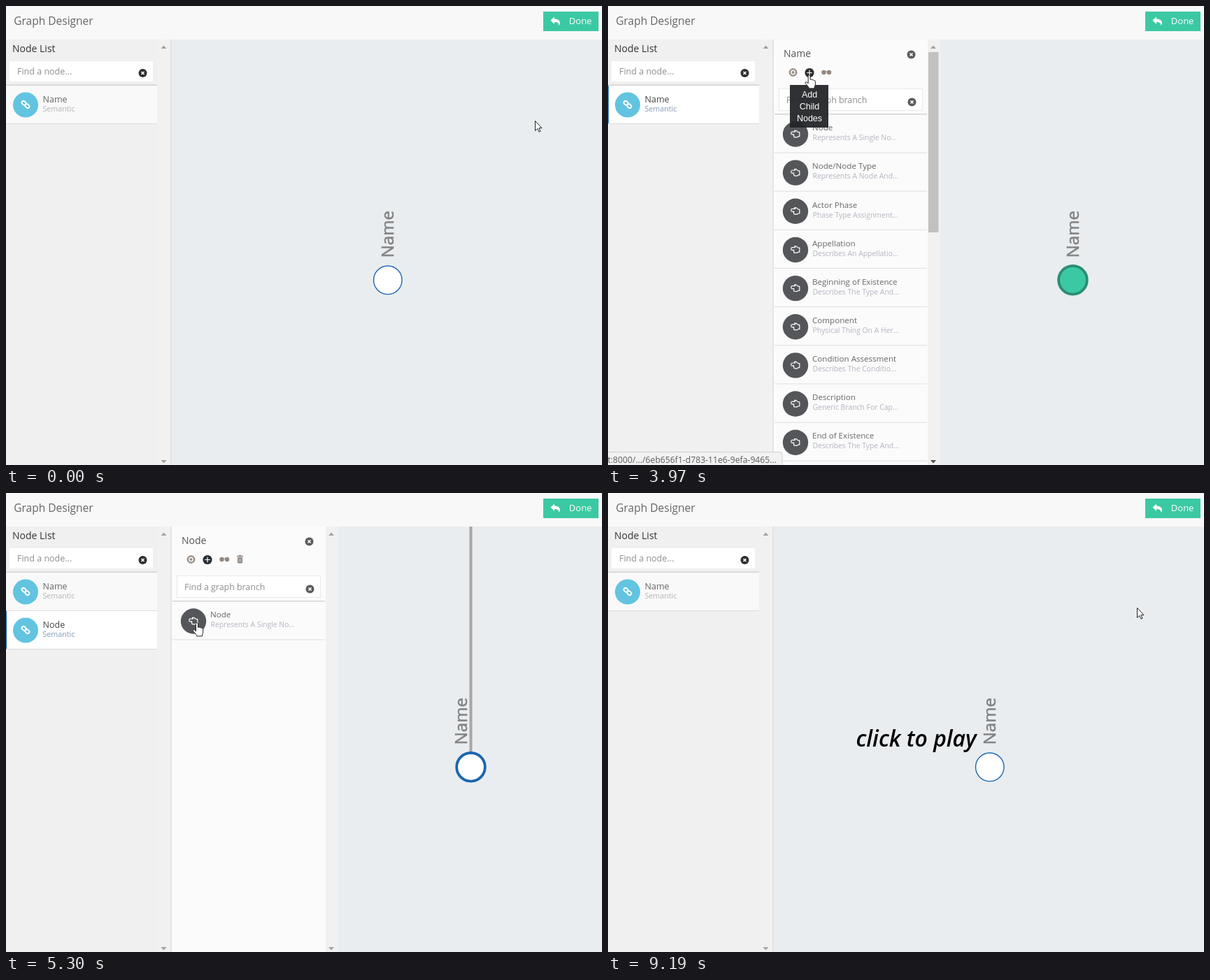
These frames come from a looping animation (852x657 px, 9250 ms). An HTML page:

```html
<!DOCTYPE html>
<html lang="en">
<head>
<meta charset="utf-8">
<title>Graph Designer</title>
<style>
  html, body { margin: 0; width: 100%; height: 100%; overflow: hidden; background: #e9edf0; }
  svg { display: block; font-family: "Open Sans", sans-serif; }
  .tip { font-family: "Liberation Sans", Arial, sans-serif; }
</style>
</head>
<body>
<svg id="stage" width="852" height="657" viewBox="0 0 852 657"></svg>
<script>
const stage = document.getElementById('stage');
const $ = id => document.getElementById(id);
const show = (id, on) => $(id).setAttribute('display', on ? 'inline' : 'none');
const move = (id, x, y, k = 1) => $(id).setAttribute('transform', `translate(${x} ${y}) scale(${k})`);

// Markup helpers
const text = (x, y, size, str, fill, extra = '') =>
  `<text x="${x}" y="${y}" font-size="${size}" fill="${fill}" ${extra}>${str}</text>`;
const rect = (x, y, w, h, fill, extra = '') =>
  `<rect x="${x}" y="${y}" width="${w}" height="${h}" fill="${fill}" ${extra}/>`;
const circle = (x, y, r, fill, extra = '') =>
  `<circle cx="${x}" cy="${y}" r="${r}" fill="${fill}" ${extra}/>`;
const path = (d, extra) => `<path d="${d}" ${extra}/>`;
const group = (id, body, extra = '') => `<g id="${id}" ${extra}>${body}</g>`;
const field = (x, y, w, h) => rect(x + .5, y + .5, w - 1, h - 1, '#fff', 'stroke="#e9e9e9"');
const range = (n, fn) => Array.from({ length: n }, (_, i) => fn(i)).join('');

const closeIcon = (x, y, fill) => circle(x, y, 6, fill) +
  path(`M${x - 2} ${y - 2}l4 4m0-4l-4 4`, 'stroke="#fff" stroke-width="1.6"');
const scrollArrows = (x, y2 = 650) =>
  path(`M${x - 4} 61h8l-4-4.5zM${x - 4} ${y2}h8l-4 4.5z`, 'fill="#a3a3a3"');

function listItem(y, name, active) {
  const link = x => `<rect x="${x}" y="-2.4" width="6.6" height="4.8" rx="2.4"/>`;
  return rect(0, y, 216, 54, active ? '#fff' : '#f9f9f9') +
    rect(0, y + 54, 216, 1, '#dcdcdc') +
    (active ? rect(0, y, 1.2, 54, '#2c78b5') : '') +
    circle(28, y + 27.5, 18, '#62c4e0') +
    `<g transform="translate(28 ${y + 27}) rotate(42)" fill="none" stroke="#fff" stroke-width="1.9">${link(-6.4)}${link(-.2)}</g>` +
    text(52.5, y + 24, 12.5, name, active ? '#444' : '#666') +
    text(52.5, y + 37, 10.7, 'Semantic', active ? '#839ab5' : '#b4b4ba');
}

function branchRow(i, title, detail) {
  const y = 183.5 + 55.15 * i;
  return rect(238, y + 26, 218, 1, '#dfdfdf') + circle(268, y, 18.2, '#545659') +
    path(`M263 ${y - 3.4}h4.6l-1-1.8h2.2l3 2.4h2v6h-2l-1.2 1.2h-3.6c-1.4 0-1.6-1.2-1-1.8-1-.4-1-1.6-.2-2.2h-2.8c-1.7 0-1.7-3.8 0-3.8z`,
      'fill="none" stroke="#fff" stroke-width="1.2" stroke-linejoin="round"') +
    text(292, y - 5.3, 11.6, title, '#666') + text(292.5, y + 8.7, 10.4, detail, '#b3b5c1');
}

const branches = [
  ['Node', 'Represents A Single No...'], ['Node/Node Type', 'Represents A Node And...'],
  ['Actor Phase', 'Phase Type Assignment...'], ['Appellation', 'Describes An Appellatio...'],
  ['Beginning of Existence', 'Describes The Type And...'], ['Component', 'Physical Thing On A Her...'],
  ['Condition Assessment', 'Describes The Conditio...'], ['Description', 'Generic Branch For Cap...'],
  ['End of Existence', 'Describes The Type And...']];

const gear = fill => circle(264.5, 95, 4.6, 'none', `stroke="${fill}" stroke-width="2.4"`) +
  circle(264.5, 95, 5.5, 'none', `stroke="${fill}" stroke-dasharray="2 1.4"`) + circle(264.5, 95, 2, fill);
const plus = fill => circle(288, 95.5, 6.6, fill) +
  path('M284.2 95.5h7.6M288 91.7v7.6', 'stroke="#fff" stroke-width="1.2"');

const form = (id, name, label, lines, on) => group(id,
  text(247, 151, 12.5, 'Node Name', '#666') + field(247, 157, 197, 31) + text(259, 177, 10.9, name, '#666') +
  text(247, 235, 12.5, 'Data type', '#666') + field(247, 241, 197, 35) + text(259.5, 262, 12.5, 'semantic', '#555') +
  path('M425.5 255.5h9l-4.5 5z', 'fill="#5c5048"') + rect(242, 303, 207, 1, '#d9d9d9') +
  rect(247.5, 319.5, 25.5, 13.5, on ? '#68bb6c' : '#fff', `rx="6.7" stroke="${on ? '#68bb6c' : '#ddd'}"`) +
  circle(on ? 266.5 : 254.5, 326.5, 6.2, '#fff', `stroke="${on ? '#a9d7ab' : '#bbb'}"`) +
  text(285, 331, 12.6, label, '#555') +
  lines.map((s, i) => text(285, 345 + 13.5 * i, 9.6, s, '#8a9bb2')).join(''));

const label = (id, body, x, y) => text(0, 0, 24, body, '#858585',
  `id="${id}" stroke="#777" stroke-width=".5" transform="translate(${x} ${y}) rotate(-90)"`);

const spinner = range(8, i => {
  const a = (-42 - 45 * i) * Math.PI / 180;
  return circle(57 * Math.cos(a), 57 * Math.sin(a), Math.max(10.5, 18 - 2.5 * i), '#8c8c8c', 'opacity=".38"');
});

stage.innerHTML =
  rect(0, 0, 852, 657, '#e9edf0') +
  group('graph',
    path('M0 0V-952', 'id="edge" stroke="#a6a6a6" stroke-width="4"') +
    group('child', circle(0, -952, 20.3, '#3bc9a3', 'stroke="#2a8f74" stroke-width="3.6"') + label('childName', 'Node', 9, -984)) +
    circle(0, 0, 20, '#fff', 'id="root"') + label('rootName', 'Name', 9, -32)) +

  rect(0, 0, 852, 48, '#f8f8f8') + text(11.3, 27, 15.5, 'Graph Designer', '#666') +
  rect(768, 8, 79, 28, '#3bc9a3') +
  group('done', path('M778.5 20.5l5.5-5v3c5.5 0 8 2.5 8 5.5 0 2-1 3-1.8 4 .6-3.5-1.7-5-6.2-5v3z', 'fill="#fff"') +
    text(804.8, 26, 13, 'Done', '#fff')) +

  rect(0, 48, 216, 609, '#f0f0f0') + rect(216, 48, 20, 609, '#f1f1f1') + rect(235.5, 48, 1, 609, '#d9d9d9') +
  scrollArrows(225.5) + text(9, 66, 14, 'Node List', '#333') +
  rect(5, 79, 205, 29, '#fff') + text(16, 98, 12.5, 'Find a node...', '#8d8d8d') + closeIcon(195.5, 96, '#2b2e31') +
  rect(0, 112.5, 216, 1.5, '#d4d4d4') +
  group('idleName', listItem(114, 'Name', false)) +
  group('activeName', listItem(114, 'Name', true)) +
  group('activeNode', listItem(169, 'Node', true)) +

  group('panel',
    rect(237, 48, 220, 609, '#fbfbfb') + rect(457, 48, 18, 609, '#f1f1f1') + scrollArrows(465) +
    text(251, 73, 14, 'Name', '#555', 'id="title"') + closeIcon(433.5, 69.5, '#5b5b5b') +
    group('gearOn', gear('#2b2e31')) + group('gearOff', gear('#9c9189')) +
    group('plusOn', plus('#2b2e31')) + group('plusOff', plus('#94877f')) +
    circle(308.5, 95, 3.2, '#94877f') + circle(316, 95, 3.2, '#94877f') + rect(306, 93.5, 12, 1, '#94877f') +
    group('trash', path('M330 90.5h9M333 89.5h3', 'stroke="#8f8681" stroke-width="1.6"') +
      rect(331, 92, 7, 8.5, '#8f8681', 'rx="1"') + path('M333.3 93.5v5.5m2.4-5.5v5.5', 'stroke="#ddd" stroke-width=".8"')) +
    form('nameForm', 'Name', 'Make card', ['Data from nodes not collected in', 'other cards will be collected in the', "root card's form section"], true) +
    form('nodeForm', 'Node', 'Make sub-card', ['Data from this node and', 'downstream nodes will be', 'collected in a single form section'], false) +
    group('branches',
      field(244, 118, 206, 32) + text(255, 139, 12.4, 'Find a graph branch', '#8d8d8d') + closeIcon(434.5, 137.5, '#5b5b5b') +
      rect(238, 154, 218, 1.5, '#d4d4d4') + branchRow(0, ...branches[0]) + rect(236.5, 156, 1.2, 53, '#2c78b5', 'id="rowMark"') +
      group('moreRows', branches.slice(1).map((b, i) => branchRow(i + 1, ...b)).join('') +
        rect(458, 66, 14.5, 258, '#c1c1c1') + path('M461 650h8l-4 4.5z', 'fill="#555"')))) +

  group('dim', rect(0, 0, 852, 657, '#8a8a8a', 'opacity=".51"') + rect(769, 9, 77, 26, '#3aa890') +
    '<use href="#done" opacity=".8"/>' + circle(664.5, 392.5, 22.3, '#2b9680') + group('spinner', spinner)) +

  group('status', path('M-1 638.5H246q3 0 3 3V658H-1z', 'fill="#f2f2f2" stroke="#cfcfcf"') +
    text(241, 654, 12.2, 't:8000/.../6eb656f1-d783-11e6-9efa-9465...', '#5c5c5c', 'text-anchor="end"')) +
  group('tooltip', rect(260, 113, 55, 61, '#242528', 'opacity=".94"') +
    ['Add', 'Child', 'Nodes'].map((s, i) => text(288, 131 + 17 * i, 12.5, s, '#fff', 'class="tip" text-anchor="middle"')).join('')) +
  text(354.5, 363, 31.9, 'click to play', '#000', 'id="play" font-weight="600" font-style="italic"') +
  group('cursor',
    path('M.5.5V14.5L3.8 11.5L6 16.2L8 15.3L5.9 10.7H10z', 'id="arrow" fill="#fff" stroke="#222"') +
    path('M-1.5 1.5c0-2 3-2 3 0v5c.5-1 2.5-.8 2.6.4.8-.8 2.4-.4 2.5.7.9-.5 2.1 0 2.1 1.3v4c0 2.2-1.4 3-1.4 6H-.2c-.4-2.5-3.3-4.5-5.2-7.3-1-1.6.9-2.7 2.1-1.5l1.8 1.7z',
      'id="hand" fill="#fff" stroke="#222"'));

// Pointer moves: start, end, number of jumps, destination
const moves = [
  [310, 1190, 13, 557, 401], [1790, 2700, 13, 288, 97], [3970, 4690, 11, 273, 186],
  [5440, 6180, 11, 642, 392], [6400, 6480, 2, 644, 379], [7000, 7210, 4, 692, 337], [7280, 7790, 8, 618, 424]];

function pointer(t) {
  let x = 756, y = 164;
  for (const [from, to, jumps, nx, ny] of moves) {
    if (t < from) break;
    const p = Math.min(1, (Math.floor((t - from) * (jumps - 1) / (to - from)) + 1) / jumps);
    const e = p * p * (3 - 2 * p);
    x += (nx - x) * e;
    y += (ny - y) * e;
  }
  return [x, y];
}

function draw(t) {
  if (t >= 9190) { draw(0); show('play', true); return; }
  const within = (a, b) => t >= a && t < b;
  const [x, y] = pointer(t);
  const open = t >= 1270, added = t >= 5150;
  const listing = within(3280, 5440);

  show('play', false);
  show('panel', open);
  show('idleName', !open || added);
  show('activeName', open && !added);
  show('activeNode', added);
  $('title').textContent = added ? 'Node' : 'Name';
  show('gearOn', !listing);
  show('gearOff', listing);
  const plusHot = within(2640, 5440);
  show('plusOn', plusHot);
  show('plusOff', !plusHot);
  show('trash', added);
  show('nameForm', t < 3280);
  show('nodeForm', t >= 5440);
  show('branches', listing);
  show('moreRows', !added);
  show('rowMark', within(5150, 5300));
  show('tooltip', within(2640, 4110));
  show('status', within(2700, 4110));
  show('dim', within(5000, 5150));
  $('spinner').setAttribute('transform', `translate(403 321) rotate(${t < 5075 ? 0 : 45})`);

  // Graph: each wheel notch shrinks it by the fourth root of two, then it is dragged
  const hover = !open && Math.hypot(x - 545.5, y - 392) < 21;
  const notches = [6400, 6480, 6620, 6840].filter(s => t >= s).length;
  const k = 2 ** (-notches / 4);
  const [px, py] = t >= 7280 ? [x - 692, y - 337] : [0, 0];
  move('graph', (open ? 664.5 : 545.8) + 170 * (1 - k) + px, 392.3 + 294 * (1 - k) + py, k);
  show('edge', added);
  show('child', added);
  const selected = open && !added;
  const root = $('root');
  root.setAttribute('r', hover ? 27 : 20.3);
  root.setAttribute('fill', selected ? '#3bc9a3' : '#fff');
  root.setAttribute('stroke', selected ? '#2a8f74' : '#1b66b1');
  root.setAttribute('stroke-width', open ? 3.8 : 1.4);
  $('rootName').setAttribute('transform', `translate(${added ? -5.5 : 8.5} -32) rotate(-90)`);

  const hand = hover || within(2640, 4110) || (listing && y > 156);
  show('hand', hand);
  show('arrow', !hand);
  move('cursor', x, y);
}

function tick(now) {
  draw(now % 9250);
  requestAnimationFrame(tick);
}
draw(0);
requestAnimationFrame(tick);
</script>
</body>
</html>
```
